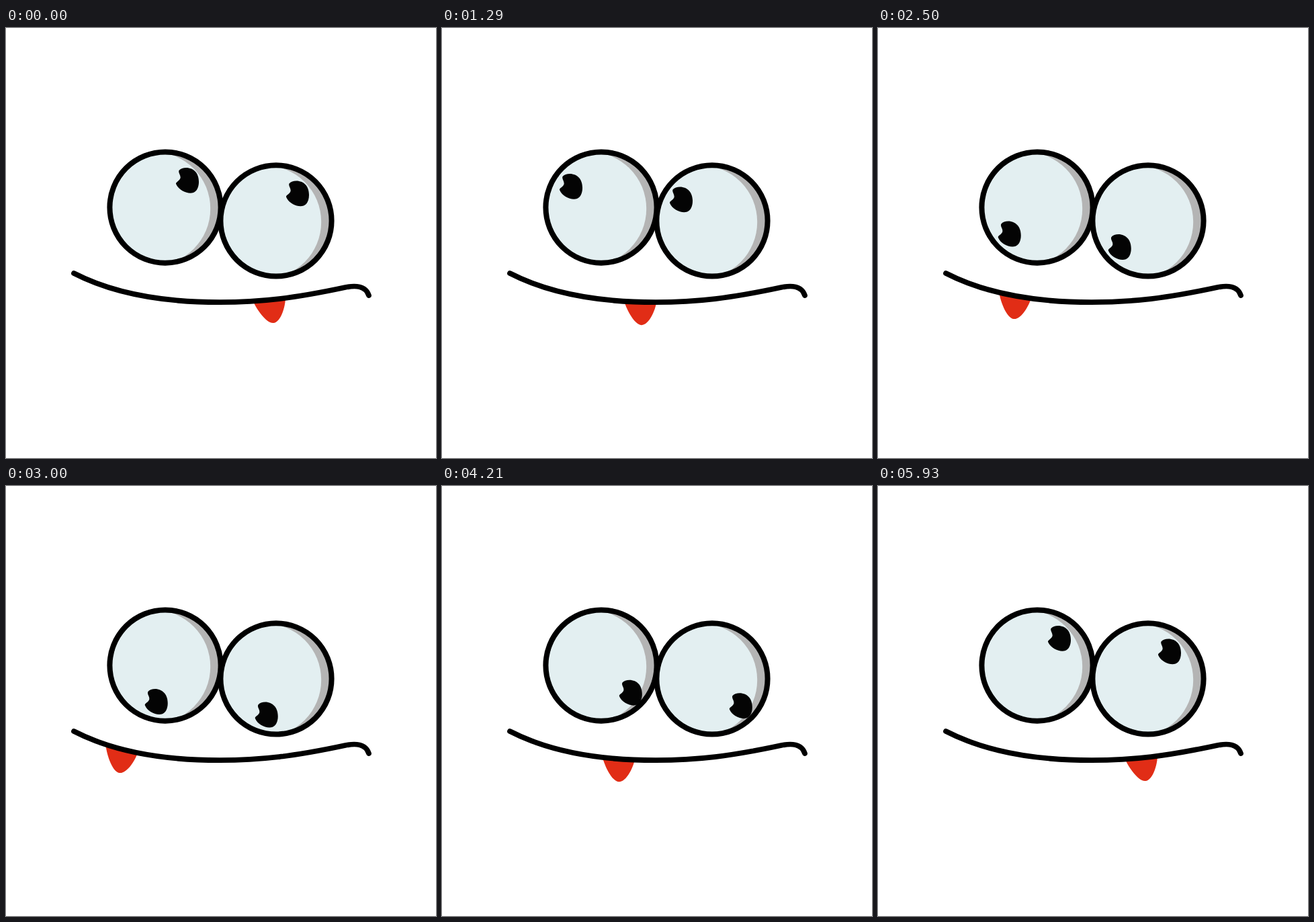
An HTML page for the animation above (6000 ms loop, 640 by 640 pixels).

```html
<!DOCTYPE html>
<html lang="en">
<head>
<meta charset="utf-8">
<title>Silly face</title>
<style>
  html, body { margin: 0; width: 100%; height: 100%; overflow: hidden; background: #fff; }
  svg { display: block; width: 100%; height: 100%; }
</style>
</head>
<body>
<svg viewBox="0 0 640 640">
  <defs>
    <clipPath id="ball"><circle r="82.6"/></clipPath>
    <clipPath id="below">
      <path d="M101 365C162 396.5 240 408.2 318 408.2C380 408.2 430 402 505 386V640H101Z"/>
    </clipPath>
    <g id="eye">
      <circle r="82.6" fill="#b4b4b4"/>
      <circle cx="-17.3" cy="1.8" r="84.5" fill="#e3eff1" clip-path="url(#ball)"/>
      <circle r="82.6" fill="none" stroke="#000" stroke-width="8"/>
    </g>
    <path id="pupil" fill="#040404" d="M-12.5 -15C-9 -19 -1 -20.5 6 -17.5C14 -14 17 -6 17 2C17 10 14 16 9 18C1 21 -13 15 -17 5C-17.5 2 -12 1 -10.5 -3.5C-9.5 -8 -14 -11 -12.5 -15Z"/>
    <!-- the two halves of the gaze loop -->
    <path id="away" d="M270 227C250 221 209 215.3 192 236C179 252 172.7 292 197 307.5C205 313 213 317.5 222 320.5"/>
    <path id="back" d="M222 320.5C238 327 271 328 281 307.5C286 298 292 286 292 273C292 256 283 239 270 227"/>
  </defs>
  <use href="#eye" x="237" y="267.1"/>
  <use href="#eye" x="402" y="286.9"/>
  <g id="gaze">
    <use href="#pupil"/>
    <use href="#pupil" x="164" y="19.5"/>
  </g>
  <g clip-path="url(#below)">
    <path id="tongue" fill="#e12d16" d="M-27 -14C-23 4 -8 31 3.3 31C14 31 25 8 25.5 -14Z"/>
  </g>
  <path fill="none" stroke="#000" stroke-width="7.8" stroke-linecap="round"
    d="M101 365C162 396.5 240 408.2 318 408.2C380 408.2 430 402 505 386C520 383 535 383 540 398"/>
</svg>
<script>
const LOOP = 6000, STEPS = 84;
const RADIUS = 748.6;            // the tongue swings like a long pendulum
const FROM = -5.24, TO = 11.95;  // its end angles in degrees

const get = id => document.getElementById(id);
const along = (path, s) => path.getPointAtLength(s * path.getTotalLength());

function draw(now) {
  const step = Math.floor((now % LOOP + 4) * STEPS / LOOP) % STEPS;
  const p = 2 * step / (STEPS - 1);

  const { x, y } = p < 1 ? along(get('away'), p) : along(get('back'), p - 1);
  get('gaze').setAttribute('transform', `translate(${x} ${y})`);

  const angle = FROM + (TO - FROM) * Math.min(p, 2 - p);
  get('tongue').setAttribute('transform',
    `translate(323.6 411.6) rotate(${angle} 0 ${-RADIUS})`);
}

const start = performance.now();
function tick() {
  draw(performance.now() - start);
  requestAnimationFrame(tick);
}
tick();
</script>
</body>
</html>
```
